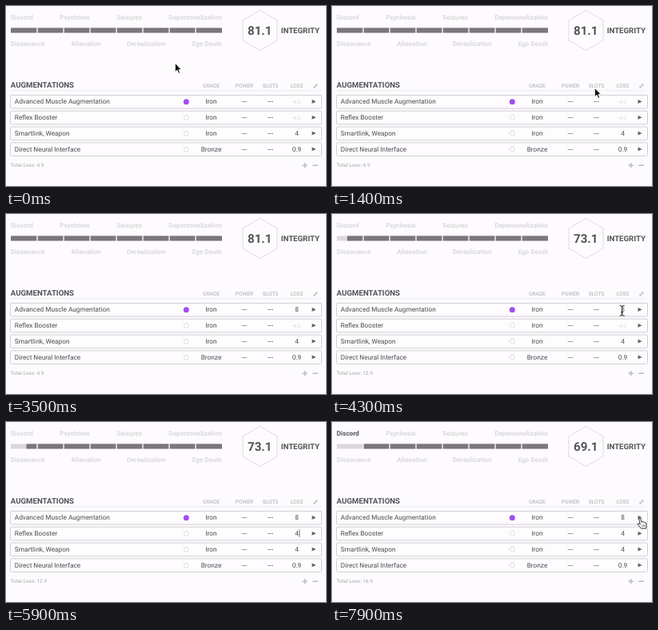
An HTML page that plays this animation: 400x225 px, repeating every 8 s.

```html
<!DOCTYPE html>
<html lang="en">
<head>
<meta charset="utf-8">
<title>Augmentations</title>
<style>
html, body { margin: 0; width: 100%; height: 100%; overflow: hidden; background: #fdfbfe; }
svg { display: block; width: 400px; height: 225px; font-family: Roboto, Arial, sans-serif; text-rendering: geometricPrecision; }
.mood { font-size: 8.2px; font-weight: 700; fill: #dad8db; }
.title { font-size: 9.65px; font-weight: 700; fill: #555356; }
.score { font-size: 15.1px; font-weight: 700; fill: #555356; }
.head { font-size: 6.6px; fill: #a9a7aa; }
.cell { font-size: 8.25px; fill: #4c4a4d; }
.hint { font-size: 6.6px; fill: #dcdadd; }
.total { font-size: 6.4px; font-weight: 500; fill: #b9b7ba; }
</style>
</head>
<body>
<svg id="stage" viewBox="0 0 400 225"></svg>
<script>
const LOOP = 8000, STEP = 100;
const stage = document.getElementById('stage');

function add(tag, attrs, parent = stage) {
  const el = document.createElementNS('http://www.w3.org/2000/svg', tag);
  for (const k in attrs) el.setAttribute(k, attrs[k]);
  parent.appendChild(el);
  return el;
}
function text(str, x, y, cls, anchor = 'start') {
  const el = add('text', { x, y, class: cls, 'text-anchor': anchor });
  el.textContent = str;
  return el;
}
const mid = (str, x, y, cls) => text(str, x, y, cls, 'middle');
const rect = (x, y, width, height, fill) => add('rect', { x, y, width, height, fill });
const line = (d, stroke, w, parent) => add('path', { d, stroke, 'stroke-width': w, fill: 'none' }, parent);
const show = (el, on) => el.setAttribute('visibility', on ? 'visible' : 'hidden');

// Integrity track
const discord = text('Discord', 5.8, 16.6, 'mood');
text('Psychosis', 67, 16.6, 'mood');
text('Seizures', 138, 16.6, 'mood');
text('Depersonalization', 270, 16.6, 'mood', 'end');
text('Dissonance', 5.8, 49.6, 'mood');
text('Alienation', 81.3, 49.6, 'mood');
text('Derealization', 151, 49.6, 'mood');
text('Ego Death', 270, 49.6, 'mood', 'end');
rect(6, 27.4, 264, 6.1, '#dad8db');
const fill = rect(6, 27.4, 264, 6.1, '#7a767c');
for (let i = 1; i < 8; i++) rect(5.4 + i * 33, 26.5, 1.3, 8, '#fdfbfe');

add('path', { d: 'M317.5 5.3L339 17.8V43L317.5 55.5L296 43V17.8Z', fill: 'none', stroke: '#dddbde' });
const score = mid('81.1', 317.2, 36, 'score');
text('INTEGRITY', 343.7, 33.9, 'title');

// Table
text('AUGMENTATIONS', 5.8, 101.6, 'title');
const cols = { GRADE: 256.5, POWER: 298, SLOTS: 330.5, LOSS: 363.5 };
for (const name in cols) mid(name, cols[name], 102.3, 'head');
line('M384 102.8L389.6 97.2', '#b5b3b6', 0.8);
add('path', { d: 'M383.8 100.3H386.6V103.1ZM387.2 96.9V99.7H390Z', fill: '#b5b3b6' });
rect(5.5, 105.6, 389, 0.7, '#e6e4e7');

const rows = [
  ['Advanced Muscle Augmentation', 'Iron', ''],
  ['Reflex Booster', 'Iron', ''],
  ['Smartlink, Weapon', 'Iron', '4'],
  ['Direct Neural Interface', 'Bronze', '0.9']
].map(([name, grade, loss], i) => {
  const y = 119.6 + i * 19.8, base = y + 2.8;
  add('rect', { x: 5.5, y: y - 8.2, width: 389, height: 16.6, rx: 2, fill: '#fefcff', stroke: '#d0ced1' });
  text(name, 10.8, base, 'cell');
  const dot = i ? { r: 3, fill: 'none', stroke: '#d4d2d5', 'stroke-width': 0.8 } : { r: 3.5, fill: '#a24df0' };
  add('circle', { cx: 225.3, cy: y + 0.1, ...dot });
  mid(grade, cols.GRADE, base, 'cell');
  mid('---', cols.POWER, base, 'cell');
  mid('---', cols.SLOTS, base, 'cell');
  add('path', { d: `M382.5 ${y - 2.5}L387.5 ${y - 0.1}L382.5 ${y + 2.3}Z`, fill: '#5e5c5f' });
  const hint = mid('4.0', cols.LOSS, y + 2.4, 'hint');
  show(hint, !loss);
  const value = mid(loss, cols.LOSS, base, 'cell');
  const caret = rect(366.5, y - 5, 0.8, 9.6, '#555356');
  show(caret, false);
  return { hint, value, caret };
});

const total = text('', 5.8, 201.4, 'total');
line('M370.4 199.2H376.8M373.6 196V202.4M383.4 199.2H389.8', '#bbb9bc', 1.5);

// Pointers
const ring = add('circle', { r: 14, fill: 'rgba(90,90,90,.1)', stroke: '#8a888b', 'stroke-width': 1 });
const pointer = {};
for (const kind of ['arrow', 'beam', 'hand']) pointer[kind] = add('g', { 'stroke-linejoin': 'round' });
add('path', { d: 'M.4 .4V11.6L3 9.2L4.8 13.3L6.6 12.5L4.9 8.5H8.2Z', fill: '#111', stroke: '#fff', 'stroke-width': 0.8 }, pointer.arrow);
const beam = 'M-3 -6.3Q-.3 -6.3 0 -5Q.3 -6.3 3 -6.3M0 -5V5M-3 6.3Q-.3 6.3 0 5Q.3 6.3 3 6.3M-1.7 2H1.7';
line(beam, '#fff', 2, pointer.beam);
line(beam, '#222', 1.1, pointer.beam);
add('path', {
  d: 'M-1.4 1.2Q-.3 -.6 .8 1.2L1.8 5.3Q3 4.2 3.9 5.4Q5.2 4.6 5.9 5.9Q7.3 5.4 7.7 7.1Q8.6 10.2 7.4 13.3H1.3Q.5 11.4 -2.8 8.9Q-3.7 7.4 -2.1 7.1Q-1.1 7.1 .1 8.2Z',
  fill: '#fff', stroke: '#222', 'stroke-width': 0.9
}, pointer.hand);
line('M2.5 8.8L2.9 11.4M4.3 8.6L4.6 11.2M6 8.5L6.2 11', '#222', 0.6, pointer.hand);

// Motion tables: time first, then values
const path = [
  [800, 211, 71], [900, 213, 71.5], [1000, 224, 74], [1200, 276, 88], [1400, 328, 102],
  [1500, 344, 107], [1600, 354, 112], [1700, 362.7, 120], [1800, 364, 120.7],
  [4100, 364, 120.7], [4300, 362.6, 120.8], [4500, 363.5, 125], [4700, 366, 133],
  [4900, 367.7, 139.4], [5000, 368, 140.4], [7300, 368, 140.4], [7400, 371, 138],
  [7500, 382, 129], [7600, 393, 123], [7700, 393, 123], [7800, 389, 122], [7900, 385.1, 119.8]
];
const edge = [
  [4100, 6], [4200, 9.5], [4300, 19], [4400, 24], [4500, 25.5],
  [6700, 25.5], [6800, 28.5], [6900, 35], [7000, 39]
];
const kinds = [[0, 'arrow'], [1700, 'beam'], [3000, ''], [4200, 'beam'], [5800, ''], [7400, 'beam'], [7500, 'arrow'], [7800, 'hand']];
const scores = [[0, '81.1'], [4000, '73.1'], [6700, '69.1']];
const totals = [[0, '4.9'], [3900, '12.9'], [6500, '16.9']];

const held = (table, t) => table.filter(k => k[0] <= t).pop()[1];
function tween(table, t) {
  const i = table.findIndex(k => k[0] > t);
  if (i < 1) return (i ? table[table.length - 1] : table[0]).slice(1);
  const [a, b] = [table[i - 1], table[i]];
  const p = (t - a[0]) / (b[0] - a[0]);
  return a.slice(1).map((v, j) => v + (b[j + 1] - v) * p);
}
const within = (t, a, b) => t >= a && t < b;

function entry(row, str, t, from, off) {
  const typed = t >= from;
  show(row.hint, !typed);
  row.value.textContent = typed ? str : '';
  show(row.caret, within(t, from, off));
}

function draw(t) {
  const [x] = tween(edge, t);
  fill.setAttribute('x', x);
  fill.setAttribute('width', 270 - x);
  const dark = Math.min(1, Math.max(0, (t - 6700) / 300));
  const shade = Math.round(218 - 133 * dark);
  discord.style.fill = `rgb(${shade},${shade - 2},${shade + 1})`;
  score.textContent = held(scores, t);
  total.textContent = 'Total Loss: ' + held(totals, t);
  entry(rows[0], '8', t, 2900, 3500);
  entry(rows[1], '4', t, 5700, 6200);

  const [px, py] = tween(path, t), kind = held(kinds, t);
  for (const k in pointer) {
    show(pointer[k], k === kind);
    pointer[k].setAttribute('transform', `translate(${px} ${py})`);
  }
  ring.setAttribute('cx', px);
  ring.setAttribute('cy', py);
  show(ring, within(t, 2000, 2100) || within(t, 5100, 5200));
}

const start = performance.now();
function tick() {
  const t = (performance.now() - start) % LOOP;
  draw(Math.floor(t / STEP) * STEP);
  requestAnimationFrame(tick);
}
tick();
</script>
</body>
</html>
```
